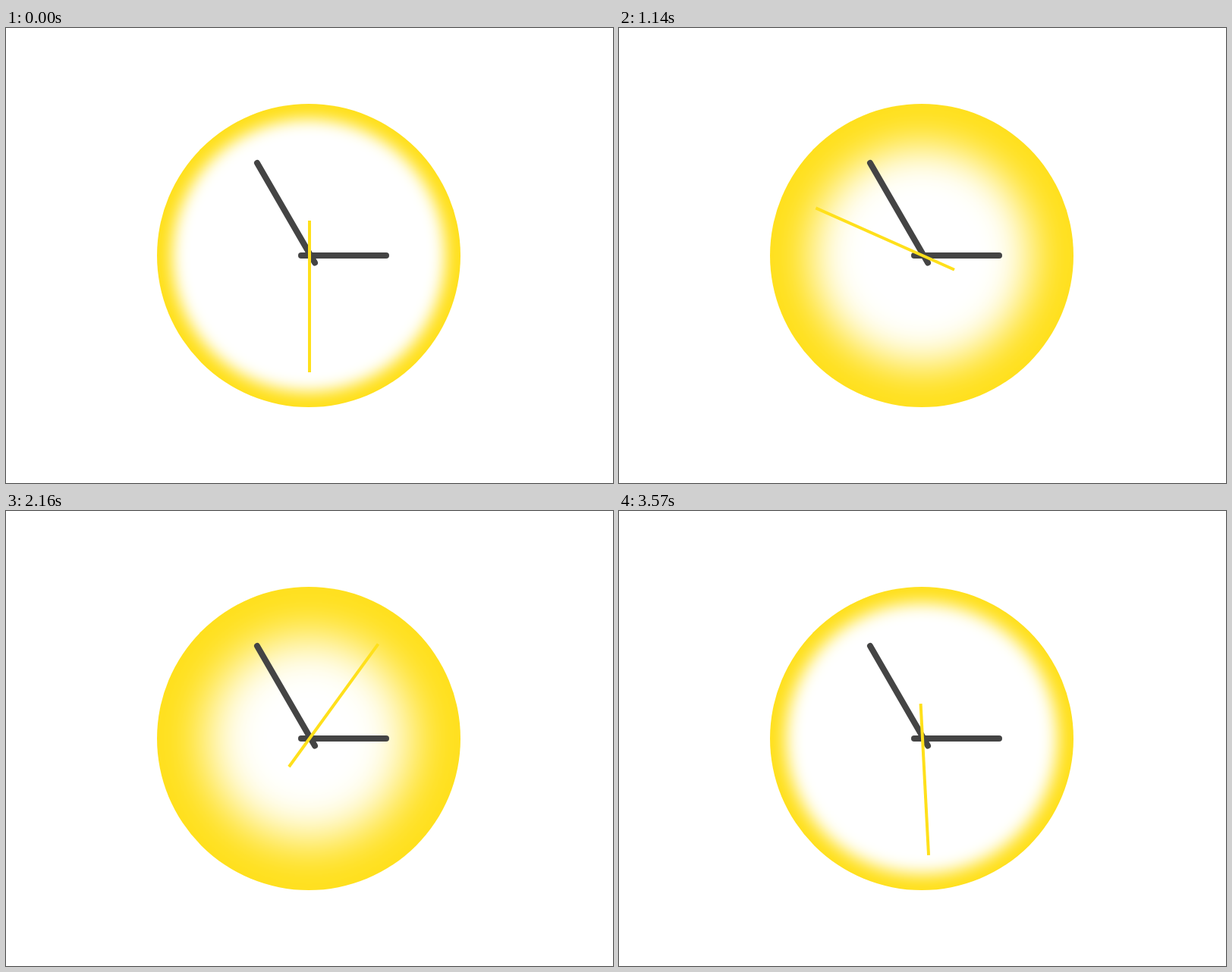
An HTML page for the animation above (3.6 s loop, 800 px wide and 600 px high).

```html
<!DOCTYPE html>
<html lang="en">
<head>
<meta charset="utf-8">
<title>Clock</title>
<style>
  html, body { margin: 0; width: 100%; height: 100%; overflow: hidden; background: #fff; }
  .face {
    position: absolute; left: 199px; top: 100px; width: 400px; height: 400px;
    border-radius: 50%;
  }
  svg { position: absolute; left: 0; top: 0; }
  .hand { stroke: #444; stroke-width: 8; stroke-linecap: round; }
  .second { stroke: #ffe01b; stroke-width: 4; transform-origin: 400px 300px; }
</style>
</head>
<body>
<div class="face"></div>
<svg width="800" height="600" viewBox="0 0 800 600">
  <line class="hand" x1="389" y1="300" x2="501" y2="300"/>
  <line class="hand" x1="331" y1="178" x2="407" y2="309.6"/>
  <line class="second" x1="400" y1="254" x2="400" y2="454"/>
</svg>
<script>
  const loop = 3600, tick = 30;
  const face = document.querySelector('.face');
  const second = document.querySelector('.second');

  function draw(now) {
    const t = Math.floor((now % loop) / tick) * tick / loop;
    const swell = 1 - Math.abs(1 - 2 * t);
    const glow = 20 + 55 * swell;
    face.style.boxShadow = `inset 0 0 ${glow}px ${glow}px #ffe01b`;
    second.style.transform = `rotate(${360 * t}deg)`;
  }

  let start;
  function frame(now) {
    start ??= now;
    draw(now - start);
    requestAnimationFrame(frame);
  }
  draw(0);
  requestAnimationFrame(frame);
</script>
</body>
</html>
```
